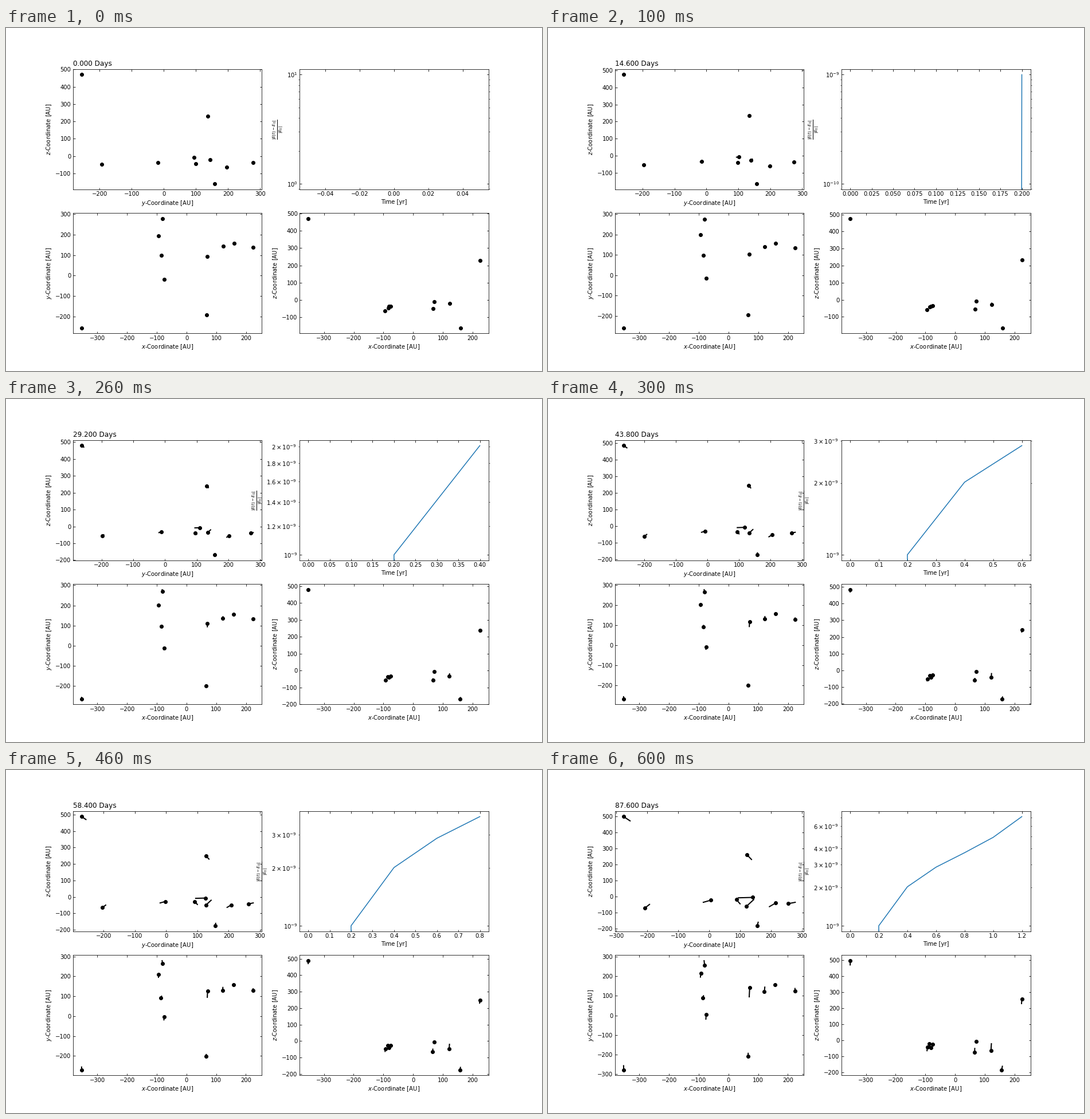
A matplotlib script for the animation above (700 ms loop, 935 px wide and 599 px high).

```python
import numpy as np
import matplotlib.pyplot as plt
from matplotlib.animation import FuncAnimation

W, H, DPI = 935, 599, 72
FRAMES, INTERVAL = 7, 100
DAYS_PER_STEP, YEARS_PER_STEP = 14.6, 0.2

plt.rcParams.update({
    "font.family": "DejaVu Sans",
    "font.size": 10,
    "xtick.top": True,
    "ytick.right": True,
})

# Position of each body (x, y, z) at the first and the last step, in AU
START = np.array([
    (-353.2, -256, 470.5),
    (224.1, 137, 230),
    (66.5, -193, -49.5),
    (-76, -19, -36.5),
    (70, 94.5, -8.5),
    (-84, 100, -46),
    (122.5, 144, -20),
    (-94.3, 195, -63.5),
    (-82, 278.5, -36.5),
    (159.5, 158.5, -160.5),
])
END = np.array([
    (-352.7, -277, 497),
    (225, 123, 258),
    (66, -208, -72),
    (-75, 5, -23.5),
    (71.5, 141, -6),
    (-87, 88, -20),
    (121, 120, -62.5),
    (-93, 215, -41),
    (-80.3, 256, -45),
    (157, 155.5, -182.5),
])

# Relative energy error after each step
ERROR = np.array([0, 0.9995, 2.015, 2.867, 3.72, 4.905, 7.12]) * 1e-9

steps = np.linspace(0, 1, FRAMES)[:, None, None]
paths = START + (END - START) * steps

fig, axes = plt.subplots(2, 2, figsize=((W + 1e-3) / DPI, (H + 1e-3) / DPI),
                         dpi=DPI, facecolor="white")
fig.subplots_adjust(left=0.125, right=0.9, bottom=0.11, top=0.88,
                    wspace=0.2, hspace=0.2)
(ax_yz, ax_err), (ax_xy, ax_xz) = axes


def draw_plane(ax, i, h, v):
    """Trails and bodies projected on the plane of coordinates h and v."""
    ax.clear()
    a, b = "xyz".index(h), "xyz".index(v)
    ax.plot(paths[:i + 1, :, a], paths[:i + 1, :, b], color="k", lw=2)
    ax.scatter(paths[i, :, a], paths[i, :, b], color="k")
    ax.set_xlabel(f"${h}$-Coordinate [AU]")
    ax.set_ylabel(f"${v}$-Coordinate [AU]")
    ax.tick_params(direction="in")


def draw_error(ax, i):
    ax.clear()
    ax.set_yscale("log")
    ax.plot(np.arange(i + 1) * YEARS_PER_STEP, ERROR[:i + 1], color="C0")
    ax.set_xlabel("Time [yr]")
    ax.set_ylabel(r"$\frac{|E(t)-E_0|}{|E_0|}$")
    ax.tick_params(direction="in")


def update(i):
    draw_plane(ax_yz, i, "y", "z")
    draw_plane(ax_xy, i, "x", "y")
    draw_plane(ax_xz, i, "x", "z")
    draw_error(ax_err, i)
    ax_yz.set_title(f"{i * DAYS_PER_STEP:.3f} Days", loc="left", fontsize=12)
    return []


anim = FuncAnimation(fig, update, frames=FRAMES, init_func=lambda: update(0),
                     interval=INTERVAL, repeat=True, repeat_delay=0, blit=False)
plt.show()
```
